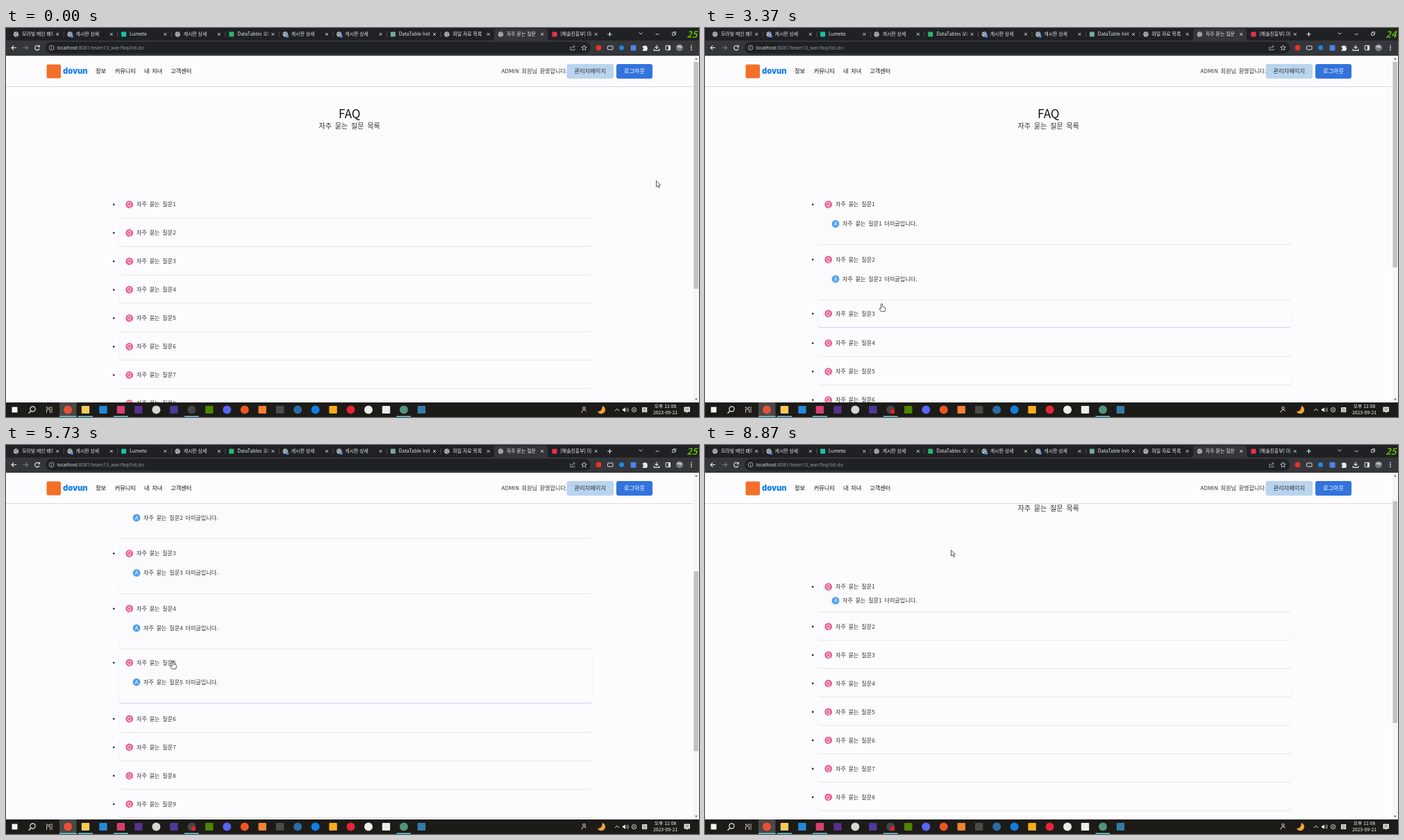
An HTML page for the animation above (8.94 s loop, 998 by 561 pixels).

```html
<!DOCTYPE html>
<html lang="ko">
<head>
<meta charset="utf-8">
<title>FAQ</title>
<style>
html, body { margin: 0; width: 100%; height: 100%; overflow: hidden; background: #fcfcfe; }
svg { display: block; }
text { font-family: "Noto Sans CJK KR", "Noto Sans CJK JP", "Noto Sans", sans-serif; white-space: pre; }
#page text, #header text { word-spacing: .185em; }
.light { font-weight: 300; }
.latin { font-family: "Open Sans", "Noto Sans", sans-serif; }
</style>
</head>
<body>
<svg id="stage" width="998" height="561" viewBox="0 0 998 561">
  <rect width="998" height="561" fill="#fcfcfe"/>
  <g id="page"></g>
  <g id="header"></g>
  <g id="scrollbar"></g>
  <g id="browser"></g>
  <g id="taskbar"></g>
  <g id="overlay"></g>
</svg>
<script>
const LOOP = 8940, SLIDE = 400, COUNT = 10;
const FIRST_Y = 254.5, PITCH = 41, ANSWER_H = 38.5, BG = '#fcfcfe';

// Click times that open and close each question.
const opened = [2060, 2700, 3365, 3900, 4753];
const closed = [8652, 7798, 7180, 6564, 5900];

const scrollKeys = [[0, 0], [4150, 0], [4550, 208], [5000, 208], [5300, 257],
  [7400, 257], [7650, 154], [8150, 154], [8400, 50], [LOOP, 50]];

const cursorKeys = [[0, 936.5, 220.5], [700, 936.5, 220.5], [1700, 213.5, 245.5], [2150, 213.5, 245.5],
  [2600, 235, 330], [2800, 235, 330], [3280, 254.5, 397], [3420, 254.5, 397],
  [3800, 258, 482], [4150, 258, 482], [4600, 263, 358], [4760, 263, 358],
  [4870, 263.5, 345], [5200, 263.5, 345], [5750, 240, 311], [5950, 240, 311],
  [6450, 231, 229.5], [6750, 231, 229.5], [7120, 231, 152], [7300, 231, 152],
  [7700, 231.5, 172], [8050, 231.5, 172], [8500, 232, 199], [8680, 232, 199],
  [8870, 354.5, 151.5], [LOOP, 354.5, 151.5]];

const el = id => document.getElementById(id);
const clamp = x => Math.min(1, Math.max(0, x));
const swing = x => .5 - Math.cos(Math.PI * clamp(x)) / 2;

function track(keys, t) {
  const i = Math.max(1, keys.findIndex(k => k[0] >= t));
  const a = keys[i - 1], b = keys[i], p = swing((t - a[0]) / (b[0] - a[0]));
  return a.slice(1).map((v, j) => v + (b[j + 1] - v) * p);
}

const rect = (x, y, w, h, fill, r = 0, extra = '') =>
  `<rect x="${x}" y="${y}" width="${w}" height="${h}" rx="${r}" fill="${fill}" ${extra}/>`;
const dot = (x, y, r, fill, extra = '') => `<circle cx="${x}" cy="${y}" r="${r}" fill="${fill}" ${extra}/>`;
const text = (x, y, size, fill, s, extra = '') =>
  `<text x="${x}" y="${y}" font-size="${size}" fill="${fill}" ${extra}>${s}</text>`;
const line = (d, color, w = 1) => `<path d="${d}" fill="none" stroke="${color}" stroke-width="${w}"/>`;
const MID = 'text-anchor="middle"', LIGHT = 'class="light"';

function globe(x, y) {
  return dot(x, y, 3.7, '#b4b8bd') +
    line(`M${x - 3} ${y - 1}q2 0 2.5 1.5t2.5 2M${x} ${y - 3}q.3 2 3 2`, '#4a4d51', .9);
}

function badge(x, y, letter, fill) {
  return dot(x, y, 5.4, fill) + text(x, y + 2.8, 7.8, '#fff', letter, MID);
}

function drawBrowser() {
  let s = rect(0, 0, 998, 18, '#202124') + rect(0, 18, 998, 22, '#35363a') +
    `<path d="M699 18q4 0 4-4V5q0-4 4-4h69q4 0 4 4v9q0 4 4 4z" fill="#35363a"/>`;
  const titles = ['모라빛 메인 페이지', '게시판 상세', 'Lumeto', '게시판 상세', 'DataTables 오류', '게시판 상세',
    '게시판 상세', 'DataTable Initialization', '파일 자료 목록', '자주 묻는 질문', '[해솔진흥부] 미래'];
  const marks = { 2: '#19c5a0', 4: '#2bb673', 7: '#74aa9c', 10: '#e5304f' };
  titles.forEach((title, i) => {
    const x = 14.5 + 77.55 * i, cx = x + 59.7;
    s += marks[i] ? rect(x - 3.5, 5.5, 7, 7, marks[i], 1) : globe(x, 9);
    if ([1, 5, 6].includes(i)) s += dot(x + 3, 12, 2, '#4d8df6');
    s += `<svg x="${x + 8.5}" y="0" width="45" height="18">${text(0, 11.4, 6.9, '#e8eaed', title)}</svg>`;
    s += line(`M${cx - 2} 7l4 4m0-4l-4 4`, '#dfe1e5', .9);
    if (i < 8) s += line(`M${x + 68.7} 5v8`, '#5a5c60', .7);
  });
  s += line('M869.5 5.8v6.4m-3.2-3.2h6.4', '#e8eaed', 1.1) + line('M911.5 6.5l2.5 2.5 2.5-2.5', '#dfe1e5', .9) +
    line('M935.5 9h5', '#dfe1e5', .9) + line('M959.5 7h3.6v3.6h-3.6zM961 7V5.6h3.6v3.6h-1.5', '#dfe1e5', .8);
  // Toolbar
  s += line('M15 28.5H8m3.2-3.2L8 28.5l3.2 3.2', '#e8eaed', 1.1) +
    line('M24.5 28.5h7m-3.2-3.2l3.2 3.2-3.2 3.2', '#77797d', 1.1) +
    line('M47.5 26.4a3.3 3.3 0 1 0 .6 3.2M48.3 24.8v2.4h-2.4', '#e8eaed', 1.1) +
    rect(57, 20, 785, 17, '#202124', 8.5) +
    line('M62.2 28.5a3.4 3.4 0 1 0 6.8 0a3.4 3.4 0 1 0-6.8 0M65.6 28v2.3M65.6 26.3v1', '#bdc1c6', .8) +
    text(73.5, 31, 7, '#e8eaed', 'localhost<tspan fill="#9aa0a6">:8081/team13_war/faq/list.do</tspan>', 'class="latin"') +
    line('M814 27.5h-1.2v4.2h6v-2M815 29.5q.5-3 4-3m-1.8-1.8l1.8 1.8-1.8 1.8', '#bdc1c6', .8) +
    line('M832.5 24.8l1.1 2.5 2.7.2-2.1 1.8.7 2.7-2.4-1.5-2.4 1.5.7-2.7-2.1-1.8 2.7-.2z', '#dfe1e5', .8) +
    dot(853.5, 28.5, 3.9, '#e0342c') + rect(866.5, 26, 7.5, 5.2, 'none', 1, 'stroke="#dfe1e5"') +
    dot(886.5, 28.5, 3.4, '#1e88e5') + rect(899.5, 24.8, 8, 8, '#4a84e8', 1) +
    `<path d="M916.8 26h2a1.3 1.3 0 0 1 2.5 0h2v2.2a1.3 1.3 0 0 1 0 2.5V33h-6.5v-2a1.3 1.3 0 0 0 0-2.6z" fill="#e8eaed"/>` +
    line('M937 24.5v5m-2.5-2.3l2.5 2.4 2.5-2.4M933.2 30v2.4h7.6V30', '#e8eaed', 1.1) +
    rect(950.2, 25.4, 6.4, 6.4, 'none', .5, 'stroke="#e8eaed"') + rect(953.8, 25.4, 2.8, 6.4, '#e8eaed') +
    dot(970, 28.5, 5, '#747a80') + `<path d="M965.2 27q4-4 9.5 0l-3 2z" fill="#b9bec3"/>`;
  for (const y of [25.6, 28.5, 31.4]) s += dot(987, y, .9, '#e8eaed');
  el('browser').innerHTML = s;
}

function drawHeader() {
  let s = rect(0, 40, 990, 45, BG) + rect(0, 84, 990, 1, '#d9d9dc') +
    rect(58.5, 52.5, 20.5, 20, '#f2702a', 2) +
    text(82, 66, 11.2, '#1680ee', 'dovun', 'style="font-family:Inter,sans-serif;font-weight:900"');
  [[129, '정보'], [156.8, '커뮤니티'], [199, '내 자녀'], [237.2, '고객센터']]
    .forEach(([x, label]) => s += text(x, 65.1, 8.2, '#111', label, 'font-weight="500"'));
  s += text(713.5, 65.1, 8.1, '#333', 'ADMIN 회원님 환영합니다.', LIGHT) +
    rect(807.5, 52, 67.5, 21, '#b9d4ee', 3) + text(841.2, 65.1, 8.3, '#333', '관리자페이지', MID + ' ' + LIGHT) +
    rect(879, 52, 52, 21, '#3273dc', 3) + text(905, 65.1, 8.2, '#fff', '로그아웃', MID + ' font-weight="500"');
  el('header').innerHTML = s;
}

function drawTaskbar() {
  let s = rect(0, 540, 998, 21, '#1c1b18') + rect(77, 540, 24.5, 21, '#494844');
  s += rect(8.5, 546.5, 8, 8, '#f4f4f4') +
    dot(38.5, 549.5, 3.6, 'none', 'stroke="#f0f0f0" stroke-width="1.2"') + line('M36 552.2l-3.5 3.6', '#f0f0f0', 1.3) +
    line('M58.5 546v2h5v-2M58.5 555v-5h5v5M66 546v9', '#d8d8d8', .9);
  // Round icons are marked with a trailing "o".
  const icons = ['#e9503ao', '#f5ca57', '#2489d8', '#d83e72', '#56308a', '#d6d6d6o', '#4b3a98', '#45464ao', '#4f8500',
    '#5865f2o', '#ee5522o', '#f48232', '#4a4a4a', '#2b6ca5o', '#0f7fe0o', '#f9ac19', '#e32636o', '#ecececo',
    '#ededed', '#52937co', '#337ba7'];
  icons.forEach((c, i) => {
    const x = 89 + 25.47 * i, fill = c.slice(0, 7);
    s += c[7] ? dot(x, 550.5, 6, fill) : rect(x - 5.7, 545, 11.4, 11, fill, 1);
  });
  for (const [x, w] of [[77, 24.5], [104, 21], [155, 21], [257, 20.5], [562.5, 20.5]]) s += rect(x, 559.5, w, 1.5, '#6ccbd6');
  s += dot(832.5, 548, 1.7, 'none', 'stroke="#eee" stroke-width=".9"') + line('M829 554.5q.5-4 3.5-4t2.5 2', '#eee', .9) +
    `<path d="M859 545a5.8 5.8 0 1 1-7 8q6 1 7-8z" fill="#f6a13a"/>` +
    line('M877 552.2l3-3 3 3', '#eee', 1) +
    `<path d="M888 549.3h1.7l2.3-2v6.8l-2.3-2H888z" fill="#eee"/>` + line('M893.5 548.6q1.6 2 0 4M895.2 547.3q2.6 3.3 0 6.6', '#ddd', .8) +
    dot(904.5, 550.6, 3.2, 'none', 'stroke="#ddd" stroke-width=".9"') + line('M902.8 549l3.4 3.4m0-3.4l-3.4 3.4', '#ddd', .8) +
    rect(916, 547, 7.2, 7.2, '#eee', .5) + text(919.6, 553, 6, '#222', '한', MID) +
    text(949.5, 548.2, 6.8, '#fff', '오후 11:08', MID) + text(949.5, 557.3, 6.8, '#fff', '2023-09-21', MID) +
    `<path d="M976.5 546.5h8.5v7h-3l-2 2v-2h-3.5z" fill="#eee"/>` + line('M978 548.8h5.5M978 551h5.5', '#333', .7);
  el('taskbar').innerHTML = s;
}

function drawItem(n, y, open, hover) {
  const extra = ANSWER_H * open, h = 33.5 + extra;
  const q = hover ? y - 1.5 : y, top = q - 14.5;
  let s = rect(162.7, top + 1, 681.6, h + (hover ? 1 : 0), hover ? '#e2e2f1' : '#e6e6ea', 4) +
    rect(163, top, 681, h, BG, 4) + dot(155.2, q, 1.3, '#222') +
    badge(177.7, q, 'Q', '#e7648f') + text(188, q + 2.9, 8.1, '#333', `자주 묻는 질문${n}`, LIGHT);
  if (open > 0) {
    const a = 5 + 14 * open;
    s += `<svg x="173" y="${q + 9}" width="661" height="${extra}">` + rect(0, 0, 661, 40, '#fbfbfe') +
      badge(15, a, 'A', '#4f9ff0') + text(25, a + 2.9, 8.1, '#333', `자주 묻는 질문${n} 더미글입니다.`, LIGHT) + '</svg>';
  }
  return s;
}

function render(t) {
  const [scroll] = track(scrollKeys, t), [cx, cy] = track(cursorKeys, t);
  let s = text(494.7, 129.7 - scroll, 17, '#111', 'FAQ', MID) +
    text(494.7, 145.4 - scroll, 10.1, '#333', '자주 묻는 질문 목록', MID + ' ' + LIGHT);
  let y = FIRST_Y - scroll, total = 0, hand = false;
  for (let i = 0; i < COUNT; i++) {
    const open = i < opened.length ? swing((t - opened[i]) / SLIDE) - swing((t - closed[i]) / SLIDE) : 0;
    const bottom = y + 20 + ANSWER_H * open, inside = cx > 163 && cx < 844 && cy < bottom;
    const hover = inside && cy > y - 20.5;
    hand = hand || inside && cy > y - 17.5;
    s += drawItem(i + 1, y, open, hover);
    y += PITCH + ANSWER_H * open;
    total += open;
  }
  el('page').innerHTML = s;

  const scale = 482 / (737 + ANSWER_H * total);
  el('scrollbar').innerHTML = rect(990, 40, 8, 500, '#f6f6f8') +
    rect(990.5, 49 + scroll * scale, 6.5, 500 * scale, '#c1c1c1') +
    `<path d="M992 45.5l2-2.5 2 2.5zM992 534.5l2 2.5 2-2.5z" fill="#666"/>`;

  const shape = hand
    ? 'M-1 1Q0-.6 1 1V5l3.6.9Q5.7 6.4 5.4 8L4.6 11.8H-1L-3.8 7.7Q-3.2 6.3-1 8Z'
    : 'M0 0V8.6L2 6.9 3.4 10 4.8 9.4 3.4 6.4 6 6.2Z';
  el('overlay').innerHTML =
    (t > 900 ? dot(270, 553.2, 3.3, '#e5202a') : '') +
    text(988, 14.2, 13, '#76d500', t > 3000 && t < 4000 ? '24' : '25',
      MID + ' font-weight="700" font-style="italic" stroke="#1d3a00" stroke-width=".3"') +
    `<path transform="translate(${cx} ${cy})" d="${shape}" fill="#fff" stroke="#333" stroke-width=".8" stroke-linejoin="round"/>`;
}

drawBrowser();
drawHeader();
drawTaskbar();
const start = performance.now();
function tick() {
  render((performance.now() - start) % LOOP);
  requestAnimationFrame(tick);
}
tick();
</script>
</body>
</html>
```
